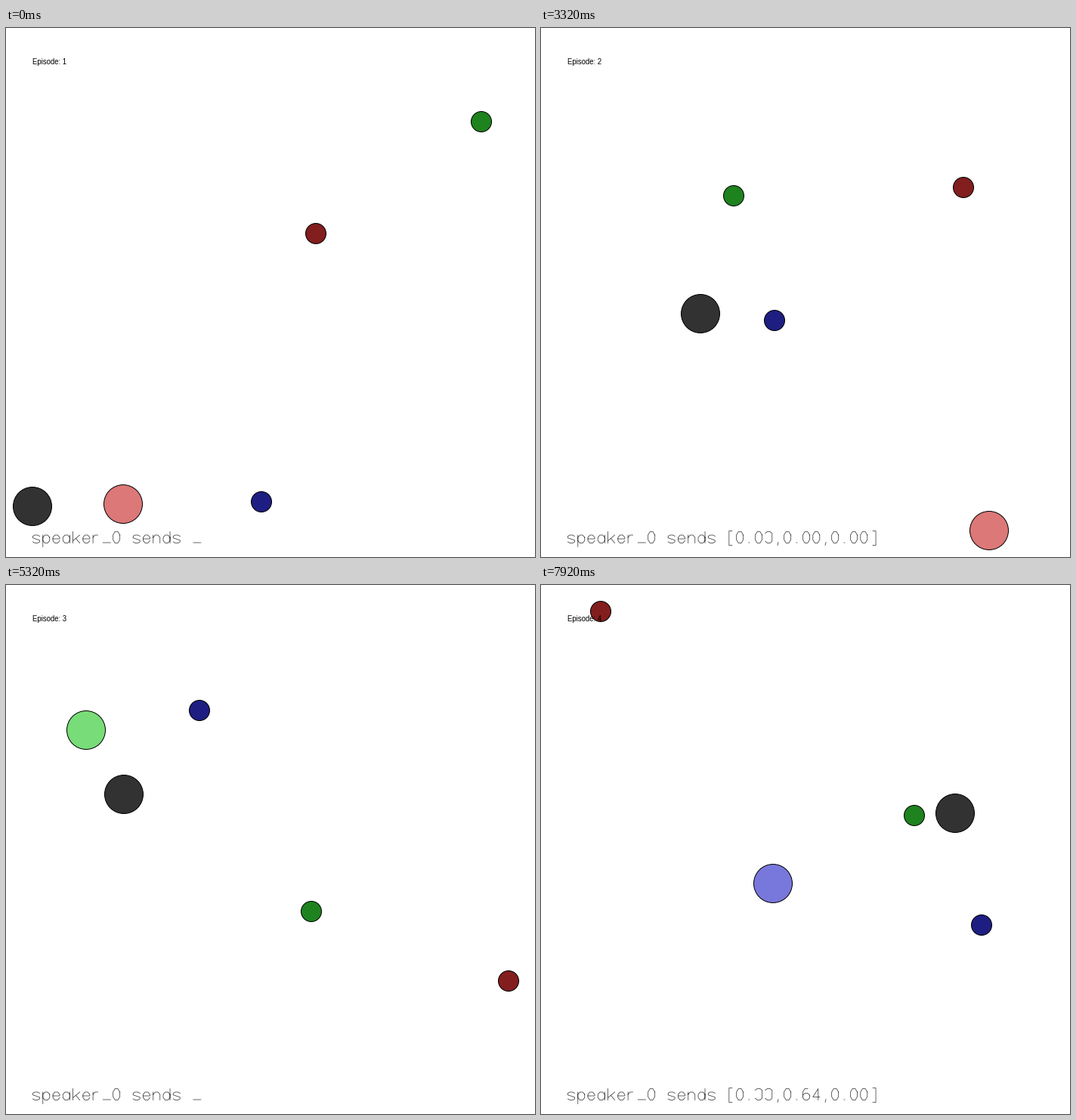
Write a matplotlib script that moves like this. It is 700x700 px and loops after 8 s.

```python
import numpy as np
import matplotlib.pyplot as plt
from matplotlib.animation import FuncAnimation
from matplotlib.patches import Circle

SIZE, DPI = 700, 100
PX = 72 / DPI            # points per pixel
HALF, REACH = 350, 315   # stage centre, farthest entity from it
INTERVAL, LOOP = 20, 8000
EPISODE_STEPS = 25

SPEAKER = np.array([.25, .25, .25])
HUES = np.full((3, 3), .15) + .5 * np.eye(3)   # red, green, blue landmarks

# The listener drifts steadily and may add a thrust after a delay.
# Each comm channel rises from zero to its peak after its onset.
EPISODES = [
    dict(goal=0, speaker=(-315, 283),
         landmarks=[(60, -77.5), (279.8, -225.05), (-11.5, 277)],
         origin=(-194.1, 276.2), drift=(0, 3.975), thrust=0, delay=0,
         peaks=(.01, 0, .23), onsets=(8, 0, 3)),
    dict(goal=0, speaker=(-175.8, 36),
         landmarks=[(265.3, -175.8), (-119.9, -161.05), (-51.5, 47.3)],
         origin=(315, 273), drift=(-.7, 0), thrust=36, delay=4.04,
         peaks=(.03, 0, .1), onsets=(2, 0, 12)),
    dict(goal=1, speaker=(-194, -73),
         landmarks=[(315, 174), (54, 82), (-94, -184)],
         origin=(-244, -158), drift=(.07, 0), thrust=-3.5, delay=14,
         peaks=(.12, 0, .04), onsets=(6, 0, 17)),
    dict(goal=2, speaker=(198, -48),
         landmarks=[(-271, -315), (144, -45), (233, 100)],
         origin=(-46, 43), drift=(.5, .34), thrust=0, delay=0,
         peaks=(.33, .64, 0), onsets=(0, 0, 0)),
]

# Stroke lettering: width, capital height, small-letter height
W, CAP, MID = 9, 15, 10.5


def arc(low, high, first=0, last=8):
    """Corners of an octagon, counter-clockwise from the right, upper one."""
    turn = 1 if last >= first else -1
    angles = np.pi / 8 + np.pi / 4 * np.arange(first, last + turn, turn)
    grow = 1 / np.cos(np.pi / 8)
    xs = W / 2 * (1 + grow * np.cos(angles))
    ys = (low + high) / 2 + (high - low) / 2 * grow * np.sin(angles)
    return list(zip(xs, ys))


def stem(x, low, high):
    return [(x, low), (x, high)]


def bracket(back, tip):
    return [(tip, CAP + 1), (back, CAP + 1), (back, -3), (tip, -3)]


GLYPHS = {
    's': [arc(5.2, MID, 0, 4) + arc(0, 5.2, 0, -4)],
    'p': [arc(0, MID), stem(0, -5, MID)],
    'e': [[(0, 5.5), (W, 5.5)] + arc(0, MID, 0, 7)],
    'a': [arc(0, MID), stem(W, 0, MID)],
    'd': [arc(0, MID), stem(W, 0, CAP)],
    'k': [stem(0, 0, CAP), [(W, MID), (0, 3)], [(4, 6), (W, 0)]],
    'r': [stem(0, 0, MID), arc(0, MID, 3, 1)],
    'n': [stem(0, 0, MID), arc(0, MID, 3, 0) + [(W, 0)]],
    '_': [[(0, .5), (W + 1, .5)]],
    '[': [bracket(1, 5)],
    ']': [bracket(7, 3)],
    '.': [[(3, .5), (4, .5)]],
    ',': [[(4, 1), (3, -3)]],
    '0': [arc(0, CAP)],
    '1': [[(2, 12), (5, CAP), (5, 0)]],
    '2': [arc(5, CAP, 3, -1) + [(0, 0), (W, 0)]],
    '3': [arc(8, CAP, 3, -1) + arc(0, 8, 0, -4)],
    '4': [[(7, 0), (7, CAP), (0, 4), (W, 4)]],
    '5': [[(W, CAP), (0, CAP)] + arc(0, 9, 3, -4)],
    '6': [arc(0, 9), arc(0, CAP, 1, 4)],
    '7': [[(0, CAP), (W, CAP), (3, 0)]],
    '8': [arc(0, 8), arc(8, CAP)],
    '9': [arc(6, CAP), arc(0, CAP, 5, 8)],
}
ADVANCE = {'[': 10.8, '.': 11.6, ',': 11.6}


def stroke_text(text, x=35.5, baseline=681.5):
    points = []
    for char in text:
        for stroke in GLYPHS.get(char, []):
            points += [(x + u, baseline - v) for u, v in stroke]
            points.append((np.nan, np.nan))
        x += ADVANCE.get(char, 13.27)
    return np.array(points).T


def glide(steps):
    """Distance covered from rest, in units of the final speed, with drag."""
    steps = max(0, steps)
    return steps - 3 * (1 - .75 ** steps)


def listener_place(ep, n):
    place = np.array(ep['origin']) + n * np.array(ep['drift'])
    place[1] += ep['thrust'] * glide(n - ep['delay'])
    return place


def comm_values(ep, n):
    since = np.maximum(0, n - np.array(ep['onsets']))
    return np.array(ep['peaks']) * (1 - .3 ** since)


def to_color(rgb):
    return rgb * 200 / 255


fig = plt.figure(figsize=(SIZE / DPI, SIZE / DPI), dpi=DPI, facecolor='white')
ax = fig.add_axes([0, 0, 1, 1])
ax.set(xlim=(0, SIZE), ylim=(SIZE, 0))
ax.axis('off')


def add_disc(radius, rgb, zorder):
    disc = Circle((0, 0), radius - .5, facecolor=to_color(rgb), edgecolor='black',
                  linewidth=PX, zorder=zorder)
    return ax.add_patch(disc)


speaker = add_disc(26, SPEAKER, 1)
message, = ax.plot([], [], color='0.25', lw=.8 * PX, zorder=2)
listener = add_disc(26, HUES[0] + .45, 3)
discs = [speaker, listener] + [add_disc(14, hue, 4) for hue in HUES]
label = ax.text(35, 48.5, '', family='Liberation Sans', fontsize=9.7 * PX,
                color='black', va='baseline', zorder=5)


def update(frame):
    step = (frame * INTERVAL + 80) // 100
    index, n = divmod(step + 1, EPISODE_STEPS)
    ep = EPISODES[index]

    places = np.array([ep['speaker'], listener_place(ep, n), *ep['landmarks']])
    camera = np.abs(places).max()   # the view zooms to hold every entity
    for disc, place in zip(discs, np.floor(HALF + places / camera * REACH + .01)):
        disc.center = place
    listener.set_facecolor(to_color(HUES[ep['goal']] + .45))

    comm = comm_values(ep, n)
    word = '[' + ','.join(f'{c:.2f}' for c in comm) + ']' if comm.any() else '_'
    message.set_data(*stroke_text('speaker_0 sends ' + word))
    label.set_text(f'Episode: {index + 1}')
    return [*discs, message, label]


anim = FuncAnimation(fig, update, frames=LOOP // INTERVAL, interval=INTERVAL,
                     repeat=True, repeat_delay=0)
plt.show()
```
